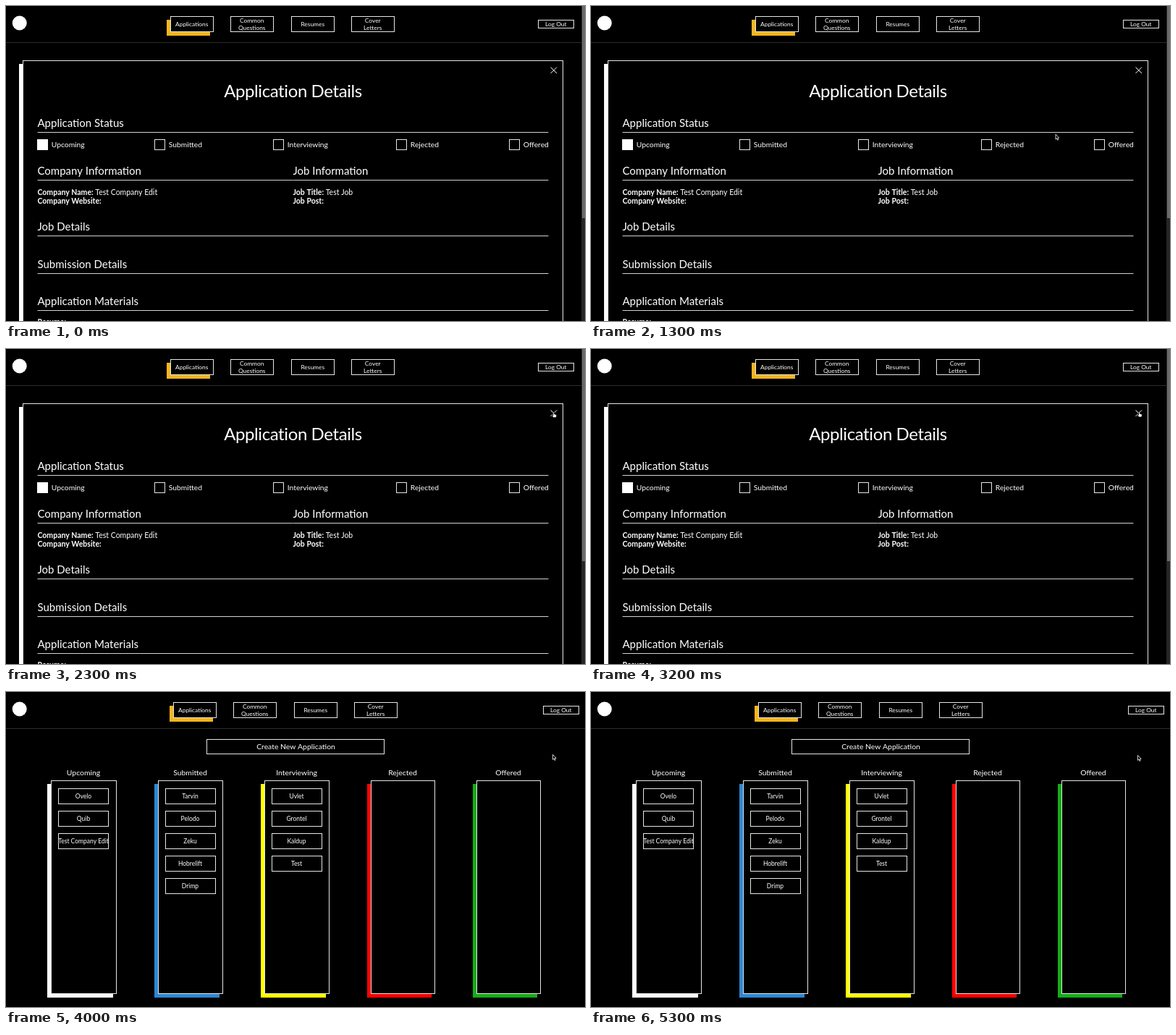
An HTML page with a canvas for the animation above (5400 ms loop, 800 by 435 pixels).

```html
<!DOCTYPE html>
<html lang="en">
<head>
<title>Job application board</title>
<style>
html, body { margin: 0; width: 100%; height: 100%; overflow: hidden; background: #000; }
canvas { display: block; width: 800px; height: 435px; }
</style>
</head>
<body>
<canvas id="stage"></canvas>
<script>
const W = 800, H = 435, LOOP = 5400, STEP = 100, CLOSE_AT = 3500;
const canvas = document.getElementById('stage');
const ctx = canvas.getContext('2d');
const ratio = window.devicePixelRatio || 1;
canvas.width = W * ratio;
canvas.height = H * ratio;

const LINE = '#e6e6e6';
const GOLD = '#f5b51c';

// Pointer keys: time, x, y
const path = [
  [100, 497, 431], [600, 538, 339], [900, 569, 260], [1200, 621, 192],
  [1700, 724, 116], [1800, 743, 102], [2100, 755, 88], [2400, 757, 86],
  [3500, 757, 86], [3900, 755.5, 86], [4000, 755, 86], [4400, 755, 87]
];

const columns = [
  { name: 'Upcoming', x: 62, w: 90, color: '#fff', cards: ['Ovelo', 'Quib', 'Test Company Edit'] },
  { name: 'Submitted', x: 210, w: 89, color: '#2f87d2', cards: ['Tarvin', 'Pelodo', 'Zeku', 'Hobrelift', 'Drimp'] },
  { name: 'Interviewing', x: 357, w: 89, color: '#ff0', cards: ['Uvlet', 'Grontel', 'Kaldup', 'Test'] },
  { name: 'Rejected', x: 504, w: 88, color: '#f00', cards: [] },
  { name: 'Offered', x: 650, w: 88, color: '#15ab18', cards: [] }
];

function rect(x, y, w, h, color) {
  ctx.fillStyle = color;
  ctx.fillRect(x, y, w, h);
}

function box(x, y, w, h, shadow) {
  if (shadow) rect(x - 5, y + 5, w + 1, h + 1, shadow);
  rect(x, y, w + 1, h + 1, '#000');
  ctx.strokeStyle = LINE;
  ctx.lineWidth = 1;
  ctx.strokeRect(x + 0.5, y + 0.5, w, h);
}

function text(str, x, y, size, align = 'left', weight = 400, spacing = 0) {
  ctx.font = `${weight} ${size}px Lato, "Open Sans", sans-serif`;
  ctx.letterSpacing = spacing + 'px';
  ctx.textAlign = align;
  ctx.fillStyle = '#fff';
  ctx.fillText(str, x, y);
}

function rule(x, y, w) {
  rect(x, y, w, 1, '#d2d2d2');
}

function header(navX, outX) {
  rect(0, 50, W, 1, '#2c2c2c');
  ctx.fillStyle = '#fff';
  ctx.beginPath();
  ctx.arc(18.7, 23.5, 10, 0, Math.PI * 2);
  ctx.fill();

  ['Applications', 'Common Questions', 'Resumes', 'Cover Letters'].forEach((label, i) => {
    const x = Math.floor(navX + i * 83.5);
    box(x, 14, 59, 21, i === 0 ? GOLD : null);
    const words = label.split(' ');
    words.forEach((word, k) => {
      const y = words.length === 1 ? 28 : 23 + k * 10.3;
      text(word, x + 29.7, y, 8.4, 'center');
    });
  });

  box(outX, 19, 49, 11);
  text('Log Out', outX + 24.7, 28, 8.4, 'center');
}

function section(title, x, y, w) {
  text(title, x, y, 15);
  rule(x, y + 7, w);
}

function field(label, value, x, y) {
  text(label, x, y, 10.5, 'left', 700);
  const end = x + ctx.measureText(label + ' ').width;
  text(value, end, y, 10.5);
}

function details() {
  header(227, 735);
  rect(795, 0, 5, H, '#262626');
  rect(796, 0, 4, 293, '#6a6a6a');

  box(23, 75, 746, 400, '#fff');
  ctx.strokeStyle = '#fff';
  ctx.lineWidth = 1;
  ctx.beginPath();
  ctx.moveTo(752.5, 84.5);
  ctx.lineTo(761, 93);
  ctx.moveTo(761, 84.5);
  ctx.lineTo(752.5, 93);
  ctx.stroke();

  text('Application Details', 396.5, 125.5, 24, 'center', 400, -0.4);
  section('Application Status', 43.5, 167, 706);
  const boxX = [43, 205, 369, 539, 695];
  columns.forEach((col, i) => {
    box(boxX[i], 184, 14, 14);
    if (i === 0) rect(boxX[i], 184, 15, 15, '#fff');
    text(col.name, boxX[i] + 19.8, 195.2, 10.3);
  });

  section('Company Information', 43.5, 233, 353);
  field('Company Name:', 'Test Company Edit', 43.5, 260.6);
  field('Company Website:', '', 43.5, 273.2);
  section('Job Information', 396.5, 233, 353);
  field('Job Title:', 'Test Job', 396.5, 260.6);
  field('Job Post:', '', 396.5, 273.2);

  section('Job Details', 43.5, 310, 706);
  section('Submission Details', 43.5, 362, 706);
  section('Application Materials', 43.5, 413, 706);
  field('Resume:', '', 43.5, 440.4);
}

function board() {
  header(231, 742);
  box(277, 65, 245, 20);
  text('Create New Application', 400.5, 79.3, 10.4, 'center');
  for (const col of columns) {
    const mid = col.x + col.w / 2;
    text(col.name, mid, 115.3, 10.4, 'center');
    box(col.x, 122, col.w, 294, col.color);
    col.cards.forEach((name, i) => {
      const y = 133 + i * 31;
      box(Math.floor(mid - 34.5), y, 69, 21);
      text(name, mid, y + 13.8, 8.5, 'center');
    });
  }
}

function pointerAt(t) {
  if (t < path[0][0]) return null;
  const next = path.findIndex(key => key[0] > t);
  if (next < 0) return path[path.length - 1].slice(1);
  const [t0, x0, y0] = path[next - 1];
  const [t1, x1, y1] = path[next];
  const k = (t - t0) / (t1 - t0);
  return [x0 + (x1 - x0) * k, y0 + (y1 - y0) * k];
}

function shape(points, fill, stroke) {
  ctx.beginPath();
  points.forEach(([x, y]) => ctx.lineTo(x, y));
  ctx.closePath();
  ctx.fillStyle = fill;
  ctx.fill();
  ctx.strokeStyle = stroke;
  ctx.lineWidth = 0.8;
  ctx.stroke();
}

function pointer(t) {
  const pos = pointerAt(t);
  if (!pos) return;
  const overClose = t < CLOSE_AT && pos[0] > 752 && pos[1] < 93;
  ctx.save();
  ctx.translate(pos[0] + 0.4, pos[1] + 0.4);
  ctx.lineJoin = 'round';
  if (overClose) {
    shape([[-0.9, 0.6], [0, 0], [0.8, 0.7], [0.9, 2.8], [3.6, 3.6], [4, 4.6],
      [3.5, 7.6], [-0.3, 7.6], [-2.6, 4.9], [-2, 4.2], [-0.8, 4.9]], '#fff', '#000');
  } else {
    shape([[0, 0], [0, 6.9], [1.5, 5.5], [2.6, 8], [3.7, 7.5], [2.7, 5.1], [4.7, 4.9]], '#000', '#fff');
  }
  ctx.restore();
}

function draw(now) {
  const t = Math.floor((now % LOOP) / STEP) * STEP;
  ctx.setTransform(ratio, 0, 0, ratio, 0, 0);
  rect(0, 0, W, H, '#000');
  if (t < CLOSE_AT) details();
  else board();
  pointer(t);
}

const start = performance.now();
function tick() {
  draw(performance.now() - start);
  requestAnimationFrame(tick);
}
tick();
</script>
</body>
</html>
```
